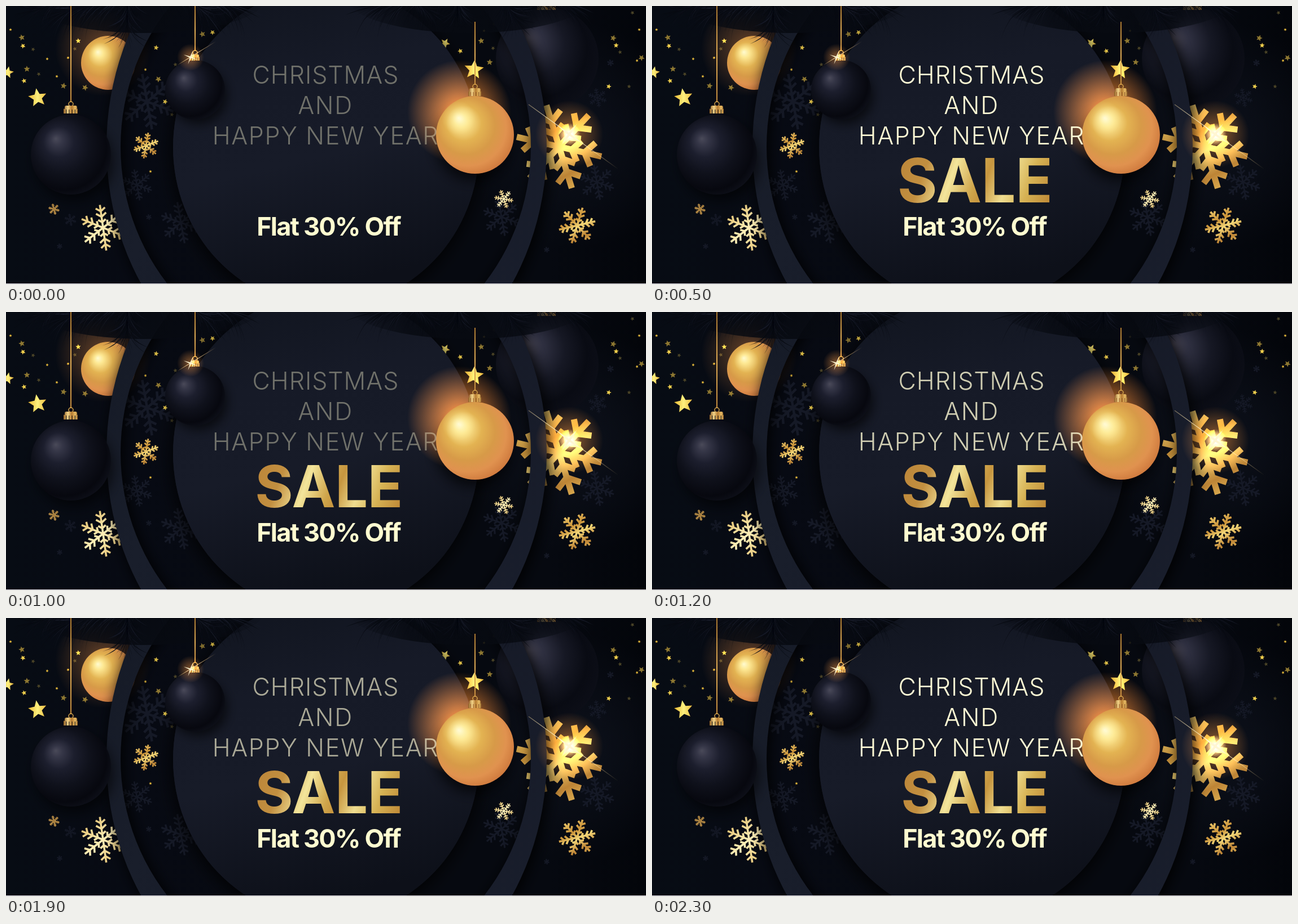
Write an HTML page with a canvas that moves like this. It is 1134x494 px and loops after 2.4 s.

```html
<!DOCTYPE html>
<html lang="en">
<head>
<meta charset="utf-8">
<title>Christmas sale</title>
<style>
html, body { margin: 0; width: 100%; height: 100%; overflow: hidden; background: #05080f; }
canvas, svg { position: absolute; left: 0; top: 0; width: 1134px; height: 494px; }
text { font-family: Inter, "Open Sans", sans-serif; text-anchor: middle; }
.title { font-size: 43px; font-weight: 300; letter-spacing: 1px; fill: #fffbd6; animation: fade 2.4s steps(3) infinite; }
.title .wide { letter-spacing: 1.7px; }
.sale { font-size: 103px; font-weight: 700; letter-spacing: -.5px; fill: url(#gold); transform-origin: 572px 309.5px; animation: pop 2.4s steps(3) infinite; }
.offer { font-size: 45px; font-weight: 700; letter-spacing: -1.8px; fill: #fffcd0; animation: blink 2.4s step-end infinite; }
@keyframes fade {
  0%, 41.667%, 83.333% { opacity: .39; }
  12.5%, 25%, 54.167%, 66.667%, 95.833%, 100% { opacity: 1; }
  37.5%, 79.167% { opacity: .64; animation-timing-function: step-end; }
}
@keyframes pop {
  0% { transform: scale(0); }
  12.5% { transform: scale(1.15); }
  25%, 100% { transform: scale(1); }
}
@keyframes blink {
  0%, 37.5%, 79.167% { opacity: 1; }
  25%, 66.667% { opacity: 0; }
}
</style>
</head>
<body>
<canvas id="scene" width="1134" height="494"></canvas>
<svg viewBox="0 0 1134 494">
  <defs>
    <linearGradient id="gold" gradientUnits="userSpaceOnUse" x1="450" y1="275" x2="690" y2="365">
      <stop offset="0" stop-color="#bd873a"/>
      <stop offset=".16" stop-color="#c28f40"/>
      <stop offset=".34" stop-color="#f3e59b"/>
      <stop offset=".5" stop-color="#cfa54b"/>
      <stop offset=".56" stop-color="#c7963f"/>
      <stop offset=".7" stop-color="#efdd90"/>
      <stop offset=".84" stop-color="#d6b254"/>
      <stop offset="1" stop-color="#c08b38"/>
    </linearGradient>
  </defs>
  <g class="title">
    <text x="566.5" y="138">CHRISTMAS</text>
    <text class="wide" x="566" y="192">AND</text>
    <text class="wide" x="566.5" y="246">HAPPY NEW YEAR</text>
  </g>
  <text class="sale" x="572" y="347">SALE</text>
  <text class="offer" x="571.5" y="408">Flat 30% Off</text>
</svg>
<script>
const W = 1134, H = 494, TAU = Math.PI * 2;
const c = document.getElementById('scene').getContext('2d');
let seed = 11;
const rnd = () => (seed = (seed * 16807) % 2147483647) / 2147483647;
const between = (a, b) => a + (b - a) * rnd();

function shade(gradient, stops) {
  stops.forEach(([at, color]) => gradient.addColorStop(at, color));
  return gradient;
}
const linear = (x0, y0, x1, y1, ...stops) => shade(c.createLinearGradient(x0, y0, x1, y1), stops);
const radial = (x, y, r, ...stops) => shade(c.createRadialGradient(x, y, 0, x, y, r), stops);

function disc(x, y, rx, ry, fill) {
  c.fillStyle = fill;
  c.beginPath();
  c.ellipse(x, y, rx, ry, 0, 0, TAU);
  c.fill();
}
function withShadow(color, blur, dx, dy, draw) {
  c.save();
  Object.assign(c, { shadowColor: color, shadowBlur: blur, shadowOffsetX: dx, shadowOffsetY: dy });
  draw();
  c.restore();
}
function line(x0, y0, x1, y1, color, width) {
  c.strokeStyle = color;
  c.lineWidth = width;
  c.beginPath();
  c.moveTo(x0, y0);
  c.lineTo(x1, y1);
  c.stroke();
}
function glow(x, y, r, color) {
  c.save();
  c.globalCompositeOperation = 'lighter';
  disc(x, y, r, r, radial(x, y, r, [0, color], [1, color.slice(0, 7) + '00']));
  c.restore();
}

const goldFill = (x, y, r) => linear(x - r * .6, y - r, x + r * .5, y + r,
  [0, '#f3d374'], [.35, '#c99239'], [.55, '#f4d778'], [.8, '#bd8436'], [1, '#e2b556']);
const creamFill = (x, y, r) => linear(x - r, y - r, x + r, y + r,
  [0, '#d9b157'], [.5, '#fff0b8'], [1, '#d8ae54']);

// Six arms; each chevron is [distance along the arm, branch length].
const fine = [[.24, .2], [.48, .27], [.72, .25]];
const bold = [[.3, .3], [.6, .34]];
function flake(x, y, r, turn, color, width, chevrons = fine) {
  c.strokeStyle = color;
  c.lineWidth = width;
  c.beginPath();
  for (let i = 0; i < 6; i++) {
    const a = turn * Math.PI / 180 + i * TAU / 6;
    const at = (d, off = 0, da = 0) => [x + Math.cos(a) * d * r + Math.cos(a + da) * off * r,
                                       y + Math.sin(a) * d * r + Math.sin(a + da) * off * r];
    c.moveTo(x, y);
    c.lineTo(...at(1));
    for (const [d, len] of chevrons) {
      c.moveTo(...at(d, len, -.95));
      c.lineTo(...at(d));
      c.lineTo(...at(d, len, .95));
    }
  }
  c.stroke();
}
function star(x, y, r, color, turn = .2) {
  c.fillStyle = color;
  c.beginPath();
  for (let i = 0; i < 10; i++) {
    const a = turn - TAU / 4 + i * TAU / 10, d = i % 2 ? r * .45 : r;
    c.lineTo(x + Math.cos(a) * d, y + Math.sin(a) * d);
  }
  c.fill();
}
function sparkle(x, y, r, turn) {
  c.save();
  c.translate(x, y);
  c.rotate(turn);
  c.fillStyle = '#fff6d2';
  c.beginPath();
  for (let i = 0; i < 8; i++) {
    const d = i % 2 ? r * .13 : r;
    c.lineTo(Math.cos(i * TAU / 8) * d, Math.sin(i * TAU / 8) * d);
  }
  c.fill();
  c.restore();
}

function ball(x, y, r, stops) {
  const g = c.createRadialGradient(x - r * .38, y - r * .4, 0, x - r * .14, y - r * .14, r * 1.2);
  disc(x, y, r, r, shade(g, stops));
}
const dark = [[0, '#4a4a59'], [.12, '#353647'], [.32, '#1c1e2d'], [.6, '#0f111b'], [.88, '#07080f'], [1, '#0d0f18']];
const gold = [[0, '#fffbd0'], [.14, '#fde893'], [.38, '#e3b352'], [.62, '#d79a48'], [.82, '#e0924f'], [1, '#cf7a3e']];

function hang(x, from, to, width, height) {
  line(x, from, x, to - 6, linear(0, from, 0, to, [0, '#a8762f'], [.5, '#e3ae55'], [1, '#c38a3c']), 2);
  c.strokeStyle = '#d8a54c';
  c.lineWidth = 1.5;
  c.beginPath();
  c.arc(x, to - 3, 4, 0, TAU);
  c.stroke();
  c.fillStyle = linear(x - width / 2, 0, x + width / 2, 0,
    [0, '#8d5c22'], [.3, '#f4d58a'], [.55, '#b57a30'], [.8, '#e9bc65'], [1, '#81521e']);
  c.beginPath();
  c.roundRect(x - width / 2 + 2, to, width - 4, height * .5, 3);
  c.fill();
  for (let i = 0; i < 5; i++) c.fillRect(x - width / 2 + i * width / 5, to + height * .4, width / 5 - 1, height * .6);
}

// A stem with curved, tapering needles fanning out towards its tip.
function branch(x0, y0, x1, y1, count, length) {
  const dir = Math.atan2(y1 - y0, x1 - x0);
  for (let i = 0; i < count; i++) {
    const t = rnd(), a = dir + between(-.8, .8), len = length * between(.6, 1);
    const x = x0 + (x1 - x0) * t, y = y0 + (y1 - y0) * t;
    const mx = x + Math.cos(dir) * len * .5, my = y + Math.sin(dir) * len * .5;
    const half = between(1, 2);
    c.fillStyle = rnd() < .16 ? '#161a27' : rnd() < .5 ? '#0b0e17' : '#070a11';
    c.beginPath();
    c.moveTo(x, y);
    c.quadraticCurveTo(mx, my - half, x + Math.cos(a) * len, y + Math.sin(a) * len);
    c.quadraticCurveTo(mx, my + half, x, y);
    c.fill();
  }
}

function backdrop() {
  c.fillStyle = linear(0, 0, W, 0, [0, '#070c14'], [.2, '#070a13'], [.5, '#060910'], [.85, '#060910'], [1, '#03050a']);
  c.fillRect(0, 0, W, H);
  disc(1010, 230, 200, 200, radial(1010, 230, 200, [0, '#0d111b'], [1, '#0d111b00']));
  for (const [x, y, r] of [[250, 170, 50], [232, 318, 28], [310, 385, 37], [878, 375, 34], [1047, 313, 32],
    [1048, 163, 17], [114, 380, 11], [95, 427, 5], [253, 375, 5], [958, 433, 5], [1071, 101, 6]])
    flake(x, y, r, 20, '#151926', Math.max(1.3, r * .09));
}

function smallStars() {
  const spots = [[8, 42], [28, 56], [30, 71], [48, 77], [73, 94], [37, 112], [32, 133], [58, 121], [90, 125], [102, 142],
    [128, 62], [122, 76], [110, 92], [140, 145], [266, 74], [300, 104], [247, 113], [270, 130], [282, 170], [294, 193],
    [256, 294], [348, 50], [366, 47], [865, 32], [847, 44], [842, 62], [805, 80], [863, 75], [890, 68], [857, 100],
    [888, 137], [1110, 12], [1122, 42], [1076, 57], [1081, 70], [1088, 82], [1118, 97], [1126, 92], [1068, 143], [1104, 143]];
  spots.forEach(([x, y], i) => star(x, y, 2.8 + i * 7 % 4, ['#e5b93c', '#8d7731', '#f1cf4d', '#4b4427'][i % 4], i));
  const bright = (x, y, r, turn) => star(x, y, r, linear(x - r, y, x + r, y, [0, '#e8b62f'], [.5, '#fdf07e'], [1, '#e9b437']), turn);
  bright(56, 163, 17, -.15);
  bright(3, 118, 11, .2);
  bright(829, 113, 18, .1);
  bright(778, 66, 9, .5);
}

function behindRing() {
  glow(172, 75, 85, '#9a5a22a0');
  ball(181, 101, 48, gold);
  ball(959, 93, 91, [[0, '#4a4857'], [.2, '#2f3041'], [.5, '#161824'], [.8, '#090b13'], [1, '#0c0e17']]);
  hang(958, -12, -4, 34, 11);
  flake(172, 394, 41, 22, creamFill(172, 394, 41), 3.6);
  flake(248, 248, 23, -20, goldFill(248, 248, 23), 2.8);
  flake(85, 361, 10, 15, '#b98d46', 1.5);
  flake(882, 343, 17, 10, creamFill(882, 343, 17), 1.8);
  flake(1012, 390, 33, -13, goldFill(1012, 390, 33), 3.7);
  flake(980, 250, 77, 13, goldFill(980, 250, 77), 11, bold);
}

function rings() {
  withShadow('#000', 26, 4, 4, () => {
    c.fillStyle = linear(178, 0, 958, 494, [0, '#151a26'], [.3, '#191e2b'], [.6, '#161a27'], [1, '#191e2c']);
    c.beginPath();
    c.ellipse(568, 250, 390, 452, 0, 0, TAU);
    c.ellipse(566.5, 250, 363.5, 383, 0, 0, TAU);
    c.fill('evenodd');
  });
  withShadow('#000', 34, 0, 6, () => disc(567, 251, 271, 284, '#10131e'));
  disc(567, 251, 271, 284, linear(480, 0, 590, 494, [0, '#121621'], [.25, '#161a27'], [.55, '#171b28'], [1, '#0d1019']));
}

function branches() {
  for (const x of [245, 820]) disc(x, -14, 215, 62, radial(x, -14, 215, [0, '#070a11'], [.55, '#070a11cc'], [1, '#070a1100']));
  branch(290, -34, 130, 2, 230, 96);
  branch(170, -34, 60, 4, 70, 70);
  branch(215, -34, 215, 24, 110, 66);
  branch(230, -34, 380, -6, 230, 86);
  branch(300, -30, 345, 6, 90, 70);
  branch(840, -34, 680, -6, 230, 92);
  branch(690, -34, 740, 2, 110, 66);
  branch(800, -30, 800, -6, 90, 60);
  branch(800, -34, 980, -8, 230, 86);
  branch(870, -30, 890, 4, 90, 66);
}

function foreground() {
  withShadow('#000a', 24, 6, 12, () => disc(115, 264, 68, 68, '#0a0b13'));
  ball(115, 264, 71, dark);
  hang(115, 0, 177, 26, 14);
  withShadow('#000a', 20, 6, 10, () => disc(335, 149, 50, 50, '#0a0b13'));
  ball(335, 149, 53, dark);
  hang(335, 0, 86, 18, 11);
  glow(327, 91, 24, '#c8782fa0');
  line(302, 106, 372, 63, linear(302, 106, 372, 63, [0, '#f4bd7300'], [.36, '#ffe6b0'], [1, '#f4bd7300']), 1.2);
  sparkle(327, 91, 13, .35);

  withShadow('#000b', 24, -4, 14, () => disc(831, 229, 66, 66, '#5b3515'));
  glow(803, 188, 92, '#ff8a2aff');
  ball(831, 229, 69, gold);
  disc(802, 199, 30, 30, radial(802, 199, 30, [0, '#fffbdccc'], [.4, '#fff3a866'], [1, '#ffe89000']));
  hang(831, 28, 146, 24, 14);

  glow(998, 228, 60, '#cb7420b0');
  glow(998, 228, 20, '#fff2b0ff');
  line(926, 175, 1085, 290, linear(926, 175, 1085, 290, [0, '#ffe0a060'], [.45, '#fffbe0'], [1, '#ffd08000']), 1.5);
  sparkle(998, 228, 23, .63);
}

backdrop();
smallStars();
behindRing();
rings();
branches();
foreground();
c.fillStyle = '#d9d5dc';
c.fillRect(0, 493, W, 1);
</script>
</body>
</html>
```
